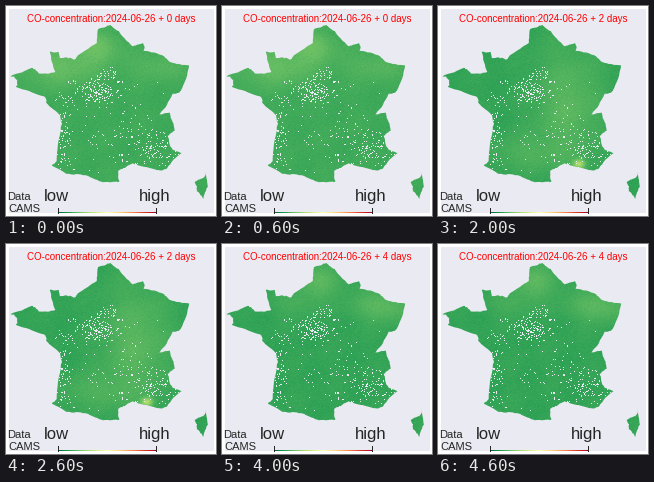
A matplotlib script for the animation above (5 s loop, 210 by 210 pixels).

```python
import numpy as np
import matplotlib.pyplot as plt
from matplotlib.animation import FuncAnimation
from matplotlib.path import Path

SIZE, DPI = 210, 100
PANEL, INK = "#eaeaf2", "#262626"
plt.rcParams["font.family"] = "Liberation Sans"

# Outline as (longitude, latitude), clockwise from the northern tip
MAINLAND = [
    (2.5, 51.08), (3.1, 50.77), (4.1, 49.98), (4.85, 50.15), (4.9, 49.75),
    (6.4, 49.45), (6.8, 49.17), (8.2, 48.97), (7.58, 47.6), (7, 47.45),
    (6.05, 46.3), (6.8, 46.4), (7.15, 45.4), (6.65, 45.1), (7, 44.3),
    (7.65, 44.1), (6.6, 43.2), (6.2, 43.08), (4.1, 43.5), (3.05, 43.05),
    (3.15, 42.43), (1.95, 42.38), (.7, 42.8), (-.7, 42.88), (-1.75, 43.37),
    (-1.4, 43.7), (-1.1, 45.5), (-1.15, 46.25), (-2.15, 46.95), (-2.3, 47.3),
    (-4.35, 47.82), (-4.25, 48.15), (-4.75, 48.4), (-3.2, 48.85),
    (-2.7, 48.55), (-1.5, 48.63), (-1.9, 49.7), (-1.25, 49.69),
    (-1.15, 49.37), (-.2, 49.3), (.12, 49.5), (1.5, 50.15), (1.6, 50.87)]
CORSICA = [(9.4, 43), (9.55, 42.1), (9.22, 41.38), (8.75, 41.85),
           (8.6, 42.4), (9.3, 42.7)]

# Plumes per day: x, y, width, height, strength
DAYS = [
    (.15, [(55, 60, 28, 14, .05), (92, 40, 14, 10, .055),
           (152, 60, 22, 10, .03)]),
    (.155, [(102, 29, 3.5, 10, .24), (80, 54, 34, 16, .045),
            (25, 72, 18, 7, .03)]),
    (.135, [(130, 100, 24, 42, .05), (85, 147, 26, 12, .03),
            (141, 158, 4, 3, .17)]),
    (.135, [(100, 70, 8, 7, .075), (166, 60, 15, 8, .06),
            (146, 130, 10, 22, .045)]),
    (.135, [(98, 38, 16, 12, .05), (160, 62, 20, 11, .055),
            (72, 60, 16, 9, .025)]),
]

# Unmapped districts: x, y, spread in x, spread in y, count
GAPS = [(92, 86, 13, 7, 160), (102, 66, 6, 5, 30), (57, 125, 5, 22, 100),
        (152, 144, 13, 12, 140), (110, 125, 32, 24, 130)]

rng = np.random.default_rng(26)


def mercator(lat):
    return np.log(np.tan(np.pi / 4 + np.radians(lat) / 2))


def project(points):
    lon, lat = np.array(points).T
    top, low = mercator(51.08), mercator(41.37)
    y = 19 + 174 * (top - mercator(lat)) / (top - low)
    return np.column_stack([70 + 13.8 * lon, y])


def outline(points, rounds=3):
    """Closed ring whose edges are split and nudged for a natural coast."""
    ring = project(points)
    for k in range(rounds):
        mid = (ring + np.roll(ring, -1, axis=0)) / 2
        mid += rng.normal(0, .7 / (k + 1), mid.shape)
        ring = np.stack([ring, mid], axis=1).reshape(-1, 2)
    return Path(np.vstack([ring, ring[:1]]), closed=True)


yy, xx = np.mgrid[0:SIZE, 0:SIZE] + .5
grain = rng.normal(0, .005, xx.shape)


def field(day):
    base, plumes = DAYS[day]
    ripple = np.sin(xx / 9 + yy / 14 + day) * np.sin(yy / 11 - xx / 23)
    value = base + grain + .005 * ripple
    for x, y, w, h, gain in plumes:
        value += gain * np.exp(-(((xx - x) / w)**2 + ((yy - y) / h)**2) / 2)
    return value


fig = plt.figure(figsize=(SIZE / DPI, SIZE / DPI), dpi=DPI, facecolor="white")
ax = fig.add_axes([0, 0, 1, 1])
ax.axis("off")
ax.add_patch(plt.Rectangle((3, 3), 205, 204, color=PANEL, lw=0, zorder=0))

land = Path.make_compound_path(outline(MAINLAND), outline(CORSICA))
heat = ax.imshow(field(0), cmap="RdYlGn_r", vmin=0, vmax=1, aspect="auto",
                 extent=(0, SIZE, SIZE, 0), interpolation="nearest", zorder=1)
heat.set_clip_path(land, ax.transData)

for x, y, sx, sy, n in GAPS:
    ax.scatter(rng.normal(x, sx, n), rng.normal(y, sy, n), marker="s",
               s=rng.uniform(.25, .75, n), c=PANEL, lw=0, zorder=2)

# Colour scale
ax.imshow(np.linspace(0, 1, 256)[None], cmap="RdYlGn_r", aspect="auto",
          extent=(52, 150, 207, 206), zorder=3)
for x in (51.5, 149.5):
    ax.plot([x, x], [202, 207], color=INK, lw=.72, zorder=4)


def label(x, y, text, size, color=INK, ha="left"):
    return ax.text(x, y, text, fontsize=size, color=color, ha=ha,
                   va="baseline", zorder=5)


title = label(105, 16, "", 7, "red", "center")
label(50.5, 195, "low", 12, ha="center")
label(149, 195, "high", 12, ha="center")
label(1.6, 194, "Data", 8)
label(2.6, 206, "CAMS", 8)
ax.set_xlim(0, SIZE)
ax.set_ylim(SIZE, 0)


def draw(day):
    heat.set_data(field(day))
    title.set_text(f"CO-concentration:2024-06-26 + {day} days")
    return heat, title


anim = FuncAnimation(fig, draw, frames=len(DAYS), interval=1000, repeat=True,
                     repeat_delay=0)
plt.show()
```
